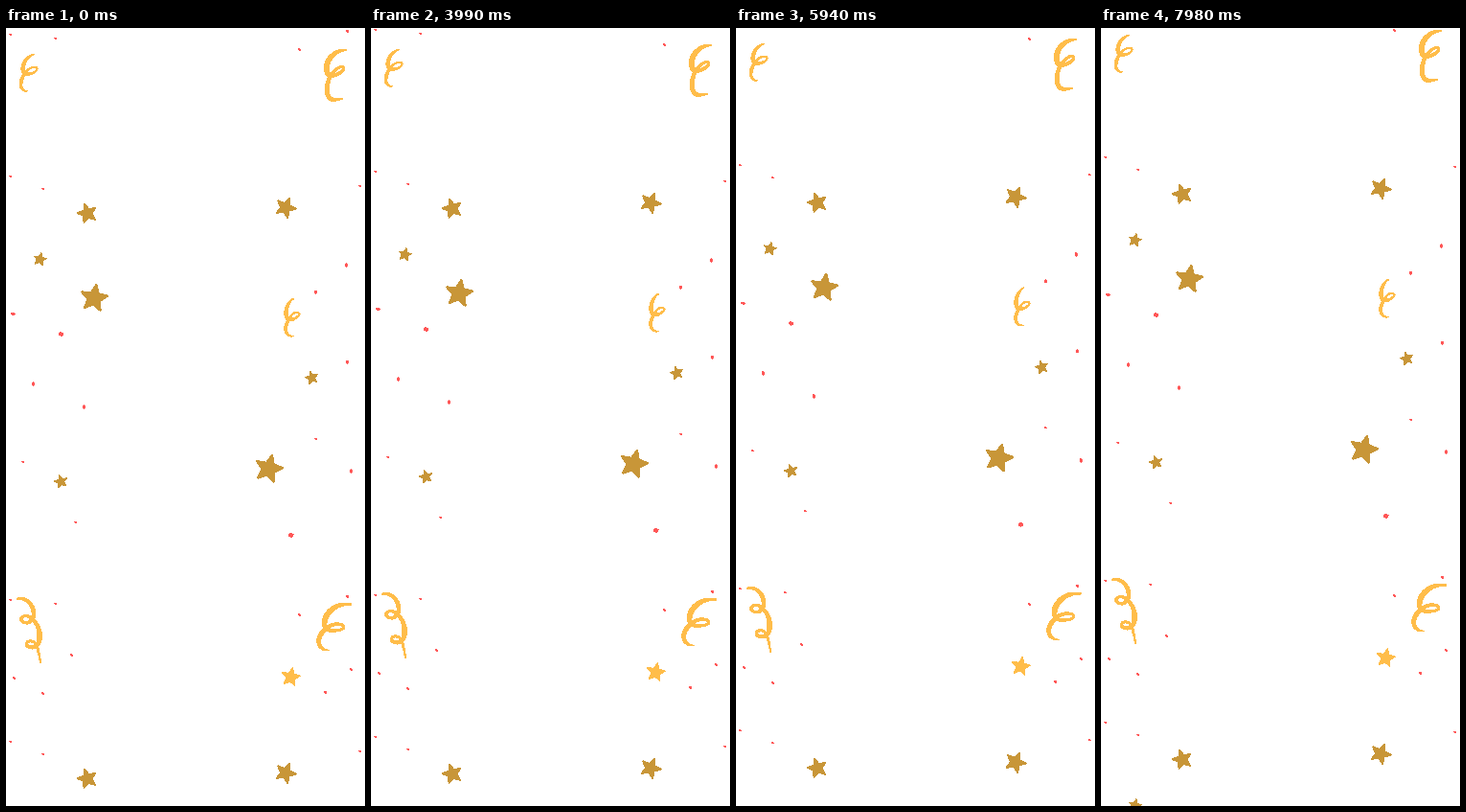
These frames come from a looping animation (375 px wide and 812 px high, 8 s). An HTML page:

```html
<!DOCTYPE html>
<html lang="en">
<head>
<meta charset="utf-8">
<title>Confetti</title>
<style>
  html, body { margin: 0; width: 100%; height: 100%; overflow: hidden; background: #fff; }
  svg { display: block; width: 375px; height: 812px; shape-rendering: crispEdges; }
</style>
</head>
<body>
<svg viewBox="0 0 375 812"><g id="confetti"></g></svg>
<script>
const LOOP = 8000, STEP = 30, LAST = 7980, RISE = 20, TILE = 590;
const GOLD = '#c89638', YELLOW = '#ffbd4a', RED = '#ff5757';
const confetti = document.getElementById('confetti');

function add(tag, attrs) {
  const el = document.createElementNS('http://www.w3.org/2000/svg', tag);
  for (const key in attrs) el.setAttribute(key, attrs[key]);
  return confetti.appendChild(el);
}

function star(x, y, radius, tilt, fill = GOLD) {
  const points = [];
  for (let i = 0; i < 10; i++) {
    const r = radius * (i % 2 ? 0.42 : 0.93);
    const a = (tilt - 90 + i * 36) * Math.PI / 180;
    points.push([x + r * Math.cos(a), y + r * Math.sin(a)]);
  }
  add('polygon', { points: points.join(' '), fill, stroke: fill,
    'stroke-width': radius * 0.17, 'stroke-linejoin': 'round' });
}

// Irregular little scrap, w by h pixels
function speck(x, y, w, h) {
  const a = w / 2, b = h / 2;
  const points = w < 4
    ? [[-a, -b], [a * 0.5, -b], [a, b], [-a * 0.5, b]]
    : [[-a, -b * 0.6], [0, -b], [a, -b * 0.4], [a * 0.8, b * 0.6], [0, b], [-a * 0.8, b * 0.4]];
  add('polygon', { points: points.map(p => [x + 0.5 + p[0], y + 0.5 + p[1]]).join(' '), fill: RED });
}

// Brush stroke whose width follows a profile along the path
function streamer(d, width, profile) {
  const path = add('path', { d, fill: 'none' });
  const length = path.getTotalLength(), count = Math.ceil(length);
  for (let i = 0; i < count; i++) {
    const from = path.getPointAtLength(length * i / count);
    const to = path.getPointAtLength(length * (i + 1) / count);
    const pos = i / count * (profile.length - 1), k = Math.floor(pos);
    const thickness = profile[k] + (profile[k + 1] - profile[k]) * (pos - k);
    add('path', { d: `M${from.x} ${from.y}L${to.x} ${to.y}`, stroke: YELLOW,
      'stroke-width': width * thickness, 'stroke-linecap': 'round' });
  }
}

const curl = [0.4, 0.8, 1, 1, 0.7, 0.52, 0.55, 0.75, 0.9, 0.75, 0.25];
const ringlet = [0.6, 0.95, 1, 0.7, 0.7, 0.95, 1.15, 0.9, 0.65, 0.65, 0.4];
streamer('M29.5 27.5C23 29 18.5 35 17.5 42C17.5 48 21 49 26 47.5C31 46.5 33.5 43 32 41.5C29 39.5 23 42 20.5 47C16 51 14.5 60 16.5 63Q18 66 22 66', 4.4, curl);
streamer('M300.5 282.5C295.5 285 292.5 292 292.5 298C292.5 304 296 305 300 304C305 302 307.5 299 306 297.5C303 295.5 298 298 296 304C291.5 309 291.5 317 293.5 319Q296 322 300.5 321.5', 4.4, curl);
streamer('M355 23C346 23 338.5 29 335.5 37C334 46 336 50 341 49.5C349 48.5 353.5 44 352.5 41.5C350 38.5 343 43 339.5 50C335 56 334 66 337 72C339 75.5 345 75.5 351 74', 6, curl);
streamer('M360 601.5C348 600 338 606 333.5 616C331 624 334 629 341 629C349 629 354.5 627 352.5 624C349 620.5 338 622 333.5 628C326.5 633 325.5 641 328 645Q331 649.5 337 649.5', 6, curl);
streamer('M12 596C21 593.5 29 602 29 612C28 621 21 622.5 16.5 619C13.5 615 20 611.5 25.5 615C34.5 622 36.5 632 34.5 640C32 648 24 647.5 21.5 644C20.5 639.5 28 637.5 32 644Q34.5 652 36 662', 4.8, ringlet);

for (const shift of [0, TILE]) {
  star(85, 193.5 + shift, 11, -16);
  star(292, 187.5 + shift, 11.5, 24);
  star(35.5, 241.5 + shift, 7.3, 12);
}
star(92, 282, 15, 9);
star(274.5, 460, 15.4, 14);
star(319.5, 365, 7.3, -14);
star(57.5, 473.5, 7.3, -14);
star(297.5, 677.5, 10.2, 10, YELLOW);

const repeated = {
  '3x2': [[4, 6], [51, 10], [4, 154], [38, 167], [369, 164]],
  '3x3': [[306, 22]],
  '4x3': [[356, 3]]
};
const single = {
  '3x2': [[17, 452], [72, 515], [323, 428]],
  '3x3': [[8, 678], [68, 654], [38, 694], [360, 669]],
  '4x3': [[333, 693]],
  '5x3': [[7, 298]],
  '4x4': [[323, 275], [356, 348]],
  '4x5': [[28, 371], [355, 247], [81, 395], [360, 462]],
  '5x5': [[57, 319]],
  '6x5': [[297, 529]]
};
function scatter(groups, shift) {
  for (const size in groups) {
    for (const [x, y] of groups[size]) speck(x, y + shift, ...size.split('x').map(Number));
  }
}
scatter(single, 0);
scatter(repeated, 0);
scatter(repeated, TILE);

// The whole field drifts upward, accelerating, in 30 ms steps
function draw(now) {
  const t = now % LOOP;
  const step = t < 90 ? 0 : Math.min(LAST, Math.floor(t / STEP) * STEP);
  confetti.setAttribute('transform', `translate(0 ${-RISE * (step / LAST) ** 2})`);
  requestAnimationFrame(draw);
}
draw(0);
</script>
</body>
</html>
```
